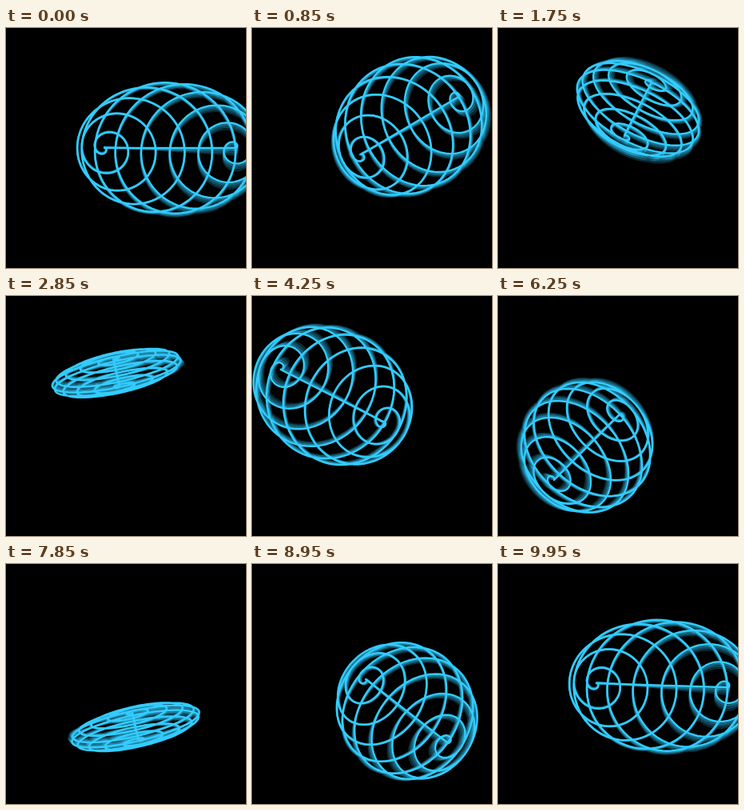
These frames come from a looping animation (300x300 px, 10 s). An HTML page with a canvas:

```html
<!DOCTYPE html>
<html>
<head>
<meta charset="utf-8">
<style>
html, body { margin: 0; width: 100%; height: 100%; overflow: hidden; background: #000; }
canvas { display: block; width: 300px; height: 300px; }
</style>
</head>
<body>
<canvas id="stage" width="300" height="300"></canvas>
<script>
const ctx = document.getElementById('stage').getContext('2d');
const LOOP = 10000;
const RADIUS = 82;
const ORBIT = 55;
const TURNS = 20;
const STEPS = 900;
const ECHO_GAP = 100 / 3;
const ECHO_ALPHA = [0.2, 0.35, 0.5, 1];

// Spiral on a slanted sphere, squeezed along its axis by cos(angle), then rotated.
function drawSpiral(time, alpha) {
  const angle = time / LOOP * 2 * Math.PI;
  const c = Math.cos(angle), s = Math.sin(angle);
  ctx.globalAlpha = alpha;
  ctx.beginPath();
  for (let i = 0; i <= STEPS; i++) {
    const phi = Math.PI * i / STEPS;
    const ring = Math.sin(phi);
    const x = ORBIT + RADIUS * c * (Math.cos(phi) + ring * Math.cos(TURNS * phi));
    const y = RADIUS * ring * Math.sin(TURNS * phi);
    ctx.lineTo(150 + x * c - y * s, 150 - x * s - y * c);
  }
  ctx.closePath();
  ctx.stroke();
}

function render(time) {
  ctx.globalAlpha = 1;
  ctx.fillStyle = '#000';
  ctx.fillRect(0, 0, 300, 300);
  ctx.strokeStyle = '#3cf';
  ctx.lineWidth = 2.5;
  ctx.lineJoin = 'round';
  const last = ECHO_ALPHA.length - 1;
  ECHO_ALPHA.forEach((alpha, i) => drawSpiral(time - (last - i) * ECHO_GAP, alpha));
}

let start;
function tick(now) {
  if (start === undefined) start = now;
  render((now - start) % LOOP);
  requestAnimationFrame(tick);
}
render(0);
requestAnimationFrame(tick);
</script>
</body>
</html>
```
